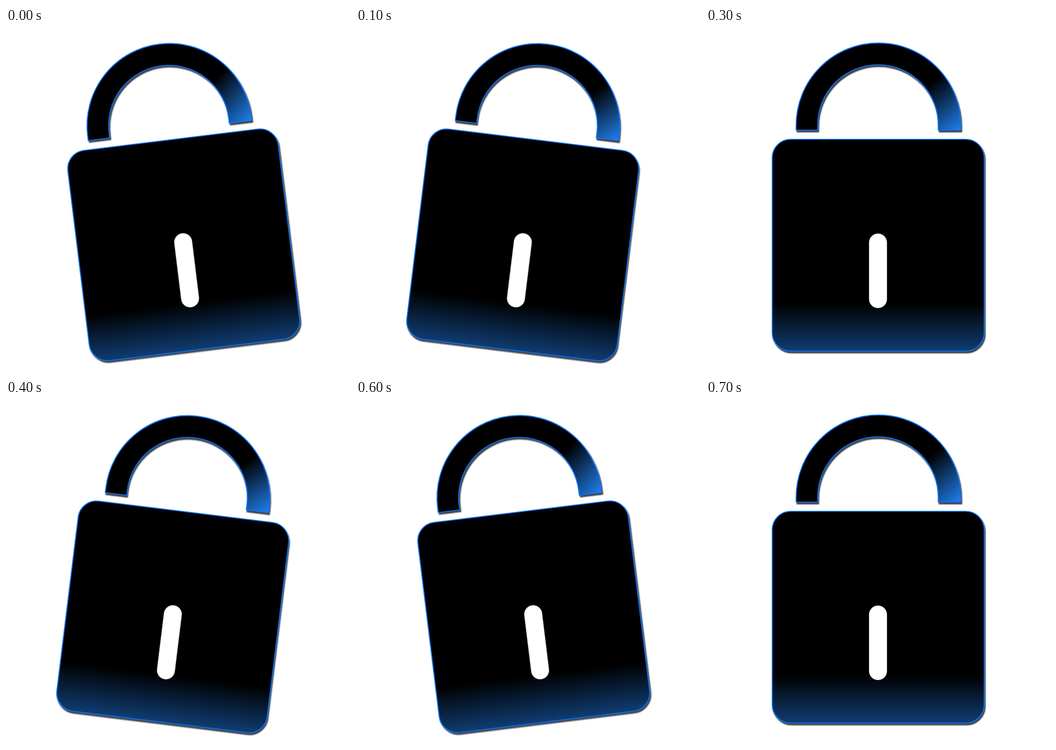
An HTML page that plays this animation: 748 px wide and 748 px high, repeating every 0.8 s.

```html
<!DOCTYPE html>
<html lang="en">
<head>
<meta charset="utf-8">
<title>Shaking padlock</title>
<style>
  html, body { margin: 0; width: 100%; height: 100%; overflow: hidden; background: #fff; }
  svg { display: block; width: 100%; height: 100%; }
  #lock { transform-origin: 374px 374px; }
  .part { stroke: #0a74ff; stroke-width: 2.2; stroke-linejoin: round; }
</style>
</head>
<body>
<svg viewBox="0 0 748 748">
  <defs>
    <linearGradient id="bodyFill" gradientUnits="userSpaceOnUse" x1="0" y1="598" x2="0" y2="703">
      <stop offset="0" stop-color="#000"/>
      <stop offset="1" stop-color="#103d72"/>
    </linearGradient>
    <linearGradient id="shackleFill" gradientUnits="userSpaceOnUse" x1="495" y1="115" x2="569" y2="203">
      <stop offset="0" stop-color="#000"/>
      <stop offset="1" stop-color="#1f7ae2"/>
    </linearGradient>
    <filter id="shadow" filterUnits="userSpaceOnUse" x="0" y="0" width="748" height="748" color-interpolation-filters="sRGB">
      <feDropShadow dx="2" dy="4" stdDeviation="1.2" flood-color="#000" flood-opacity=".75"/>
    </filter>
  </defs>
  <g id="lock">
    <g filter="url(#shadow)">
      <path class="part" fill="url(#shackleFill)"
        d="M196 222V211.5A179 179 0 0 1 554 211.5V222H505V211A131 131 0 0 0 243 211V222Z"/>
      <rect class="part" fill="url(#bodyFill)" x="144" y="242" width="461" height="460.5" rx="40"/>
    </g>
    <rect fill="#fff" x="354.5" y="447" width="39" height="162" rx="19.5"/>
  </g>
</svg>
<script>
  const STEP = 100, TILT = 7;
  // -1 leans left, 1 leans right, 0 stands upright
  const poses = [-1, 1, -1, 0, 1, 0, -1, 0];
  const last = poses.length;
  const frames = [...poses, poses[0]].map((pose, i) => ({
    offset: i / last,
    transform: `rotate(${pose * TILT}deg)`,
    easing: 'step-end'
  }));
  document.getElementById('lock').animate(frames, { duration: STEP * last, iterations: Infinity });
</script>
</body>
</html>
```
